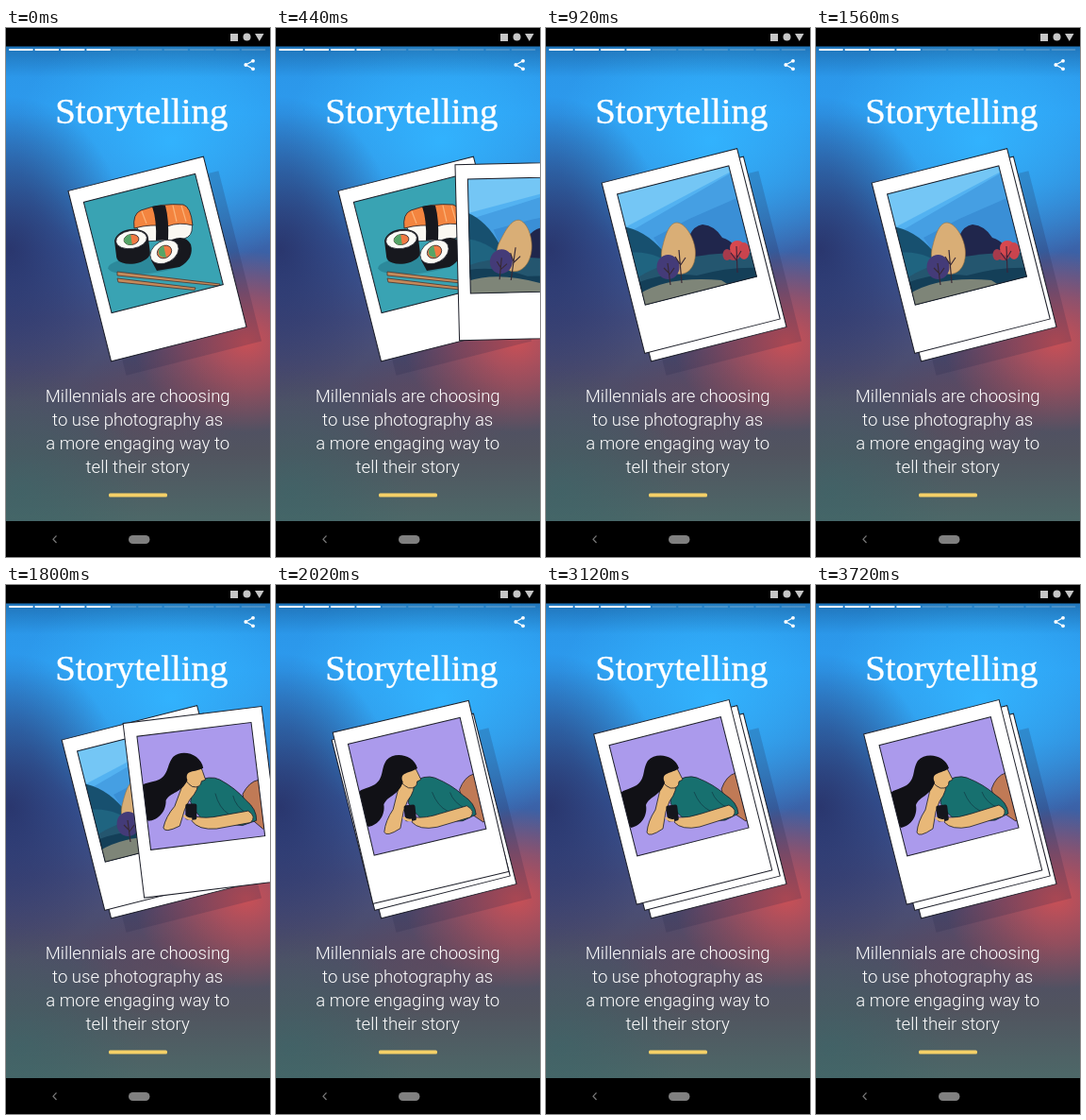
An HTML page with a canvas for the animation above (3.74 s loop, 280 by 560 pixels).

```html
<!DOCTYPE html>
<html lang="en">
<head>
<meta charset="utf-8">
<title>Storytelling</title>
<style>
html, body { margin: 0; width: 100%; height: 100%; overflow: hidden; background: #000; }
canvas { display: block; }
</style>
</head>
<body>
<canvas id="stage" width="280" height="560"></canvas>
<script>
const ctx = document.getElementById('stage').getContext('2d');
const LOOP = 3740, SLIDE = 750, TRAVEL = 250;
const REST = -14.2 * Math.PI / 180;
const CARD = { x: -74, y: -93, w: 148, h: 186 };
const WINDOW = { x: -61, y: -77.5, w: 122, h: 121 };
const INK = '#1c1e28';

function paint(fill, stroke, width = 0.8) {
  if (fill) { ctx.fillStyle = fill; ctx.fill(); }
  if (stroke) { ctx.strokeStyle = stroke; ctx.lineWidth = width; ctx.stroke(); }
}
function shape(d, fill, stroke, width = 0.8) {
  const path = new Path2D(d);
  if (fill) { ctx.fillStyle = fill; ctx.fill(path); }
  if (stroke) { ctx.strokeStyle = stroke; ctx.lineWidth = width; ctx.stroke(path); }
}
function oval(x, y, rx, ry, fill, stroke, tilt = 0) {
  ctx.beginPath();
  ctx.ellipse(x, y, rx, ry, tilt, 0, Math.PI * 2);
  paint(fill, stroke);
}
function bar(x, y, w, h, fill, r = 0) {
  ctx.beginPath();
  ctx.roundRect(x, y, w, h, r);
  paint(fill);
}
function box({ x, y, w, h }, fill, stroke) {
  ctx.beginPath();
  ctx.rect(x, y, w, h);
  paint(fill, stroke, 1);
}
function fade(top, bottom, colors) {
  const g = ctx.createLinearGradient(0, top, 0, bottom);
  colors.forEach((c, i) => g.addColorStop(i / (colors.length - 1), c));
  ctx.fillStyle = g;
  ctx.fillRect(0, top, 280, bottom - top);
}
function glow(x, y, r, rgb, alpha, squash = 1) {
  ctx.save();
  ctx.translate(x, y);
  ctx.scale(1, squash);
  const g = ctx.createRadialGradient(0, 0, 0, 0, 0, r);
  g.addColorStop(0, `rgba(${rgb},${alpha})`);
  g.addColorStop(0.5, `rgba(${rgb},${alpha * 0.55})`);
  g.addColorStop(1, `rgba(${rgb},0)`);
  ctx.fillStyle = g;
  ctx.fillRect(-r, -r, r * 2, r * 2);
  ctx.restore();
}

function backdrop() {
  fade(19, 522, ['#2a95e6', '#2d9aee', '#3286d4', '#3b62a8', '#454f80', '#4f4c68', '#51545f', '#4d6868']);
  glow(175, 120, 165, '50,180,255', 0.95, 0.85);
  glow(5, 235, 125, '40,50,104', 0.9, 1.3);
  glow(255, 332, 120, '208,80,84', 0.95, 0.8);
  glow(165, 395, 90, '115,66,84', 0.35, 0.7);
  glow(15, 490, 130, '58,100,104', 0.6);
  fade(19, 52, ['rgba(10,40,80,.3)', 'rgba(10,40,80,0)']);
}

function maki(x, y, rx, ry, depth, tilt) {
  ctx.beginPath();
  ctx.ellipse(x, y, rx + 1.5, ry + 1.5, tilt, Math.PI, Math.PI * 2);
  ctx.ellipse(x + 2, y + depth, rx + 1.5, ry, tilt, 0, Math.PI);
  ctx.closePath();
  paint('#17181e');
  oval(x, y, rx, ry, '#fbfaf5', INK, tilt);
  oval(x, y, rx * 0.48, ry * 0.58, '#f17a43', INK, tilt);
  ctx.beginPath();
  ctx.ellipse(x, y, rx * 0.48, ry * 0.58, tilt, Math.PI / 2, Math.PI * 1.5);
  paint('#55a567');
}

function sushi() {
  bar(50, 130, 220, 200, '#39a3b3');
  oval(150, 250, 42, 10, 'rgba(20,90,110,.35)', null, -0.1);
  shape('M138 209 L192 199 Q199 203 197 215 Q195 223 184 224 L145 226Z', '#faf8f2', INK);
  shape('M136 212 Q134 197 143 193 Q165 185 188 187 Q196 189 198 209 Q184 205 171 210 Q154 207 136 212Z', '#f3843f', INK);
  shape('M144 194 L149 207 M177 188 L181 205 M186 188 L191 205', null, '#fbb277', 1.2);
  shape('M155 189 Q162 187 169 188 Q173 203 172 224 L159 225 Q160 203 155 189Z', '#17181e');
  maki(133, 224, 16.5, 9.5, 16, -0.15);
  shape('M176 224 Q190 218 196 229 Q200 244 184 253 L160 257 L154 246Z', '#17181e');
  oval(168, 237, 16, 11.5, '#fbfaf5', INK, -0.5);
  oval(168, 237, 8, 6.5, '#f17a43', INK, -0.5);
  shape('M167 230 Q159 235 163 241 Q166 243 170 243Z', '#55a567');
  for (const d of ['M118 258 L227 271 L226 273 L118 262Z', 'M118 265 L201 275 L200 277.5 L119 269Z'])
    shape(d, '#c58a5b', '#4b352e');
}

function landscape() {
  bar(50, 120, 220, 200, '#53b2f1');
  shape('M70 176 L200 140 L196 152 L82 212Z', '#74c6f5');
  shape('M78 222 L128 193 L197 153 L230 205 L215 255 L90 260Z', '#459fe3');
  shape('M114 222 L152 202 L207 178 L226 235 L130 245Z', '#3a8fd6');
  shape('M80 210 Q104 213 124 236 L140 275 L95 285Z', '#17506f');
  shape('M86 238 Q116 234 140 256 L125 288 L95 285Z', '#1f6480');
  shape('M148 246 Q148 211 166 208 Q179 209 187 222 Q202 226 205 244 L200 265 L148 266Z', '#20264c');
  shape('M96 265 Q142 236 220 238 L235 280 L95 306Z', '#24566f');
  shape('M96 270 Q126 258 160 262 Q195 252 230 254 L230 300 L95 306Z', '#143f58');
  shape('M98 282 Q130 262 186 267 L200 276 L105 303Z', '#7e8578');
  oval(199, 240, 7, 6, '#b23c4c');
  oval(203, 233, 8, 8, '#d8484f');
  oval(210, 236, 6, 9, '#c9444e');
  oval(192, 240, 4.5, 6, '#a63a4c');
  shape('M139 206 C150 207 161 229 158 244 C156 257 147 262 139 260 C126 258 119 246 124 230 C127 218 131 206 139 206Z', '#d9ae76', '#99713e', 0.6);
  oval(129.5, 253, 12, 13, '#443b78');
  shape('M144 270 L141 235 M142 252 L148 243 M142 250 L137 242 M132 272 L129 249 M131 261 L136 254 M130 259 L125 254', null, '#382a36', 1.2);
  shape('M203 259 L202 231 M202 244 L207 236 M202 246 L196 238', null, '#3d2238', 1.1);
}

function portrait() {
  bar(40, 110, 220, 200, '#ab9aec');
  shape('M186 216 Q191 202 201 199 L225 235 L212 250 L192 237Z', '#c07a56', INK);
  shape('M134 210 Q149 200 160 204 Q178 211 190 222 Q203 230 204 242 L190 249 L151 251 Q138 242 132 231Z', '#17706f', INK);
  shape('M157 219 Q163 234 174 239 M176 219 Q180 230 193 236', null, '#123f49');
  shape('M123 208 L137 208 Q140 217 131 229 L127 240 L124 258 Q109 268 107 262 Q108 250 116 238Z', '#e8b878', INK);
  shape('M139 246 Q151 247 165 242 L194 233 Q204 238 198 245 L163 256 Q144 260 136 251Z', '#e8b878', INK);
  shape('M122 190 Q137 186 141 198 L145 206 L141 208 Q141 216 132 215 Q123 211 121 202Z', '#e8b878', INK);
  shape('M141 194 C137 180 117 176 108 186 C102 195 106 205 96 212 C88 217 80 216 76 224 L80 240 C84 238 83 248 90 257 C101 255 108 244 106 233 C110 223 121 224 126 209 C121 198 133 200 141 194Z', '#111116');
  ctx.save();
  ctx.translate(134, 241);
  ctx.rotate(-0.12);
  bar(-6, -8, 12, 17, '#15161d', 2);
  ctx.restore();
  shape('M127 246 Q130 250 136 249', null, '#e8b878', 2.5);
}

const photos = [
  { x: 160.5, y: 244.5, scene: sushi, start: -SLIDE },
  { x: 153.7, y: 236, scene: landscape, start: 163 },
  { x: 145.2, y: 229.8, scene: portrait, start: 1443 }
];

// Quick start and long settle: cubic Bézier (0.4, 0, 0.2, 1).
function ease(p) {
  let low = 0, high = 1;
  for (let i = 0; i < 20; i++) {
    const s = (low + high) / 2, r = 1 - s;
    if (1.2 * r * r * s + 0.6 * r * s * s + s ** 3 < p) low = s;
    else high = s;
  }
  return low * low * (3 - 2 * low);
}

function drawPhoto(photo, time) {
  const p = Math.min(1, Math.max(0, (time - photo.start) / SLIDE));
  if (!p) return;
  const left = p < 1 ? 1 - ease(p) : 0;
  ctx.save();
  ctx.translate(photo.x + TRAVEL * left, photo.y);
  ctx.rotate(REST * (1 - 2 * left));
  box(CARD, '#fff', INK);
  ctx.save();
  box(WINDOW);
  ctx.clip();
  // Scenes are laid out in stage coordinates of the resting photo.
  ctx.rotate(-REST);
  ctx.translate(-photo.x, -photo.y);
  photo.scene();
  ctx.restore();
  box(WINDOW, null, INK);
  ctx.restore();
}

function shadow() {
  ctx.save();
  ctx.translate(photos[0].x + 16, photos[0].y + 15);
  ctx.rotate(REST);
  box(CARD, 'rgba(35,35,70,.2)');
  ctx.restore();
}

function chrome() {
  bar(0, 0, 280, 19.5, '#000');
  bar(0, 522, 280, 38, '#000');
  bar(238, 6, 8, 8, '#c6c6c6');
  oval(255.5, 9.5, 4, 4, '#c6c6c6');
  shape('M264 6 H273.5 L268.75 14Z', '#c6c6c6');
  for (let i = 0; i < 10; i++)
    bar(3 + i * 27.4, 22, 25.8, 2, i < 4 ? '#fff' : 'rgba(160,190,210,.32)', 1);
  shape('M262 34.8 L254.3 39 L262 43.3', null, '#fff', 1.3);
  for (const [x, y] of [[262, 34.8], [254.3, 39], [262, 43.3]]) oval(x, y, 1.9, 1.9, '#fff');
  shape('M53.5 537.5 L50 541.2 L53.5 545', null, '#777', 1.2);
  bar(130, 537, 22.5, 9, '#808080', 4.5);
}

function copy() {
  ctx.fillStyle = ctx.strokeStyle = '#fff';
  ctx.textAlign = 'center';
  ctx.font = '38.8px "Liberation Serif", serif';
  ctx.fillText('Storytelling', 143.8, 101.3);
  ctx.lineWidth = 0.4;
  ctx.strokeText('Storytelling', 143.8, 101.3);
  ctx.font = '300 18.6px Roboto, sans-serif';
  ['Millennials are choosing', 'to use photography as', 'a more engaging way to', 'tell their story']
    .forEach((line, i) => ctx.fillText(line, 139.7, 396 + i * 25));
  bar(109, 492.5, 62, 4, '#f5d067', 1.5);
}

function draw(now) {
  const time = now % LOOP;
  backdrop();
  shadow();
  photos.forEach(photo => drawPhoto(photo, time));
  copy();
  chrome();
}

const began = performance.now();
function tick() {
  draw(performance.now() - began);
  requestAnimationFrame(tick);
}
tick();
</script>
</body>
</html>
```
